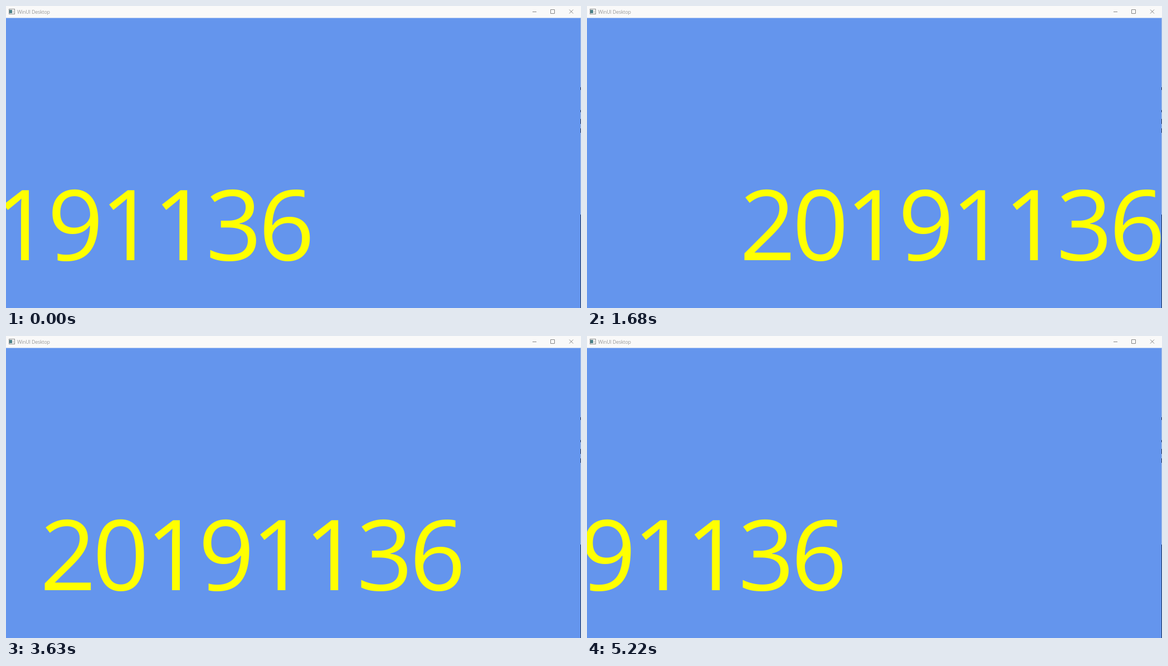
An HTML page that plays this animation: 1032x543 px, repeating every 5250 ms.

```html
<!DOCTYPE html>
<html lang="en">
<head>
<meta charset="utf-8">
<title>WinUI Desktop</title>
<style>
  html, body { margin: 0; width: 100%; height: 100%; overflow: hidden; background: #6495ed; }
  svg { display: block; width: 100%; height: 100%; }
  .title { font: 8.9px "Open Sans", "Noto Sans", sans-serif; letter-spacing: -0.2px; fill: #999; }
  .digits { font: 176px "Open Sans", "Noto Sans", sans-serif; letter-spacing: -5.9px; fill: #ff0; }
  .buttons { fill: none; stroke: #858585; }
</style>
</head>
<body>
<svg viewBox="0 0 1032 543">
  <rect width="1032" height="543" fill="#6495ed"/>
  <text class="digits" id="digits" y="457">20191136</text>

  <!-- title bar -->
  <rect width="1032" height="21.5" fill="#f9f9f9"/>
  <rect x="5.5" y="5.5" width="10" height="9" fill="#fff" stroke="#8c8c8c"/>
  <rect x="6" y="7" width="5" height="6" fill="#4a7f86"/>
  <rect x="12" y="8" width="2" height="5" fill="#d4d4d4"/>
  <text class="title" x="20" y="13.6">WinUI Desktop</text>
  <g class="buttons">
    <path d="M945 10.5h7M977.5 6.5h7v7h-7z"/>
    <path d="M1011 6.5l7 7M1018 6.5l-7 7"/>
  </g>

  <!-- strip at the right edge -->
  <rect x="1031" y="22" width="1" height="353" fill="#a9bfe6"/>
  <path d="M1031.5 146v5m0 36v4m0 12v9m0 8v8" stroke="#3c4250"/>
  <rect x="1031" y="375" width="1" height="168" fill="#1f3358"/>
</svg>
<script>
  const LOOP = 5250, STEP = 30;
  const ENTER = -400, SPAN = 900;   // the number wraps round after SPAN pixels
  const BEARING = 10;               // blank space before the first digit

  // [ms, distance travelled]: the pace drifts a little between these points
  const keys = [
    [0, 200], [540, 366], [1200, 555], [2160, 813], [3000, 1114],
    [3240, 1230], [3630, 1371], [4200, 1567], [5220, 1913]
  ];

  const digits = document.getElementById('digits');

  function travel(t) {
    const i = Math.max(1, keys.findIndex(k => k[0] >= t));
    const [t0, d0] = keys[i - 1], [t1, d1] = keys[i];
    return d0 + (d1 - d0) * (t - t0) / (t1 - t0);
  }

  function draw(ms) {
    const t = Math.floor((ms % LOOP) / STEP) * STEP;
    const left = ENTER + travel(t) % SPAN;
    digits.setAttribute('x', (left - BEARING).toFixed(2));
  }

  const start = performance.now();
  function tick() {
    draw(performance.now() - start);
    requestAnimationFrame(tick);
  }
  tick();
</script>
</body>
</html>
```
